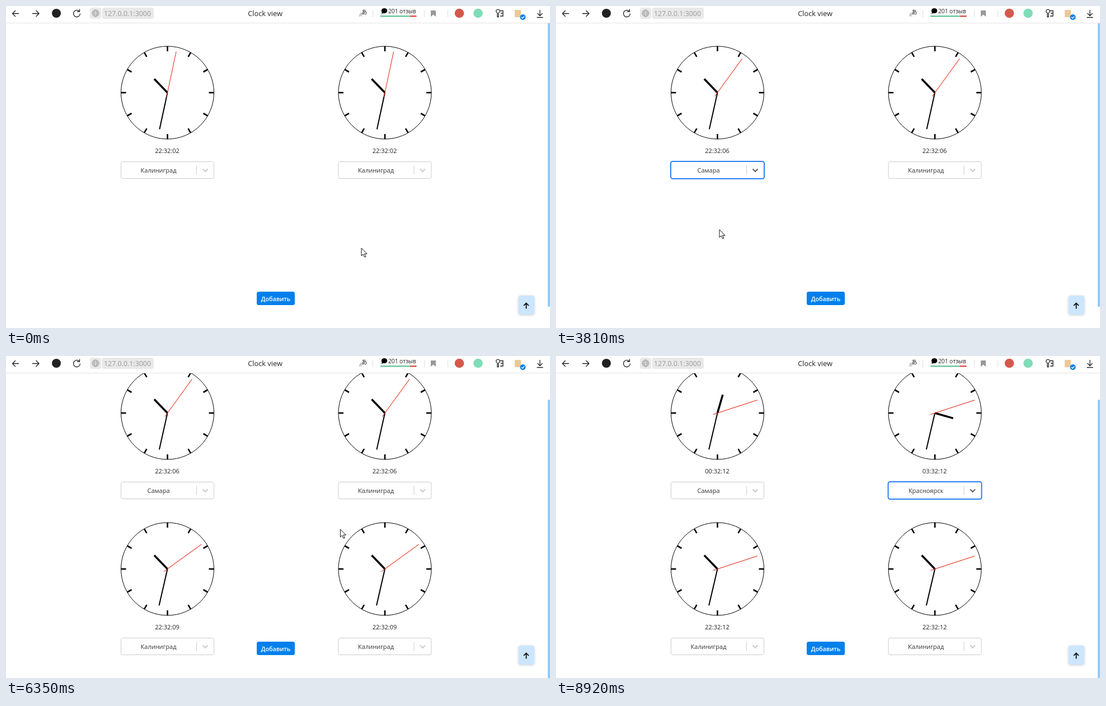
Animation, 972 px wide and 576 px high, one loop 9.47 s. Source, as an HTML page:

```html
<!DOCTYPE html>
<html lang="ru">
<head>
<meta charset="utf-8">
<title>Clock view</title>
<style>
html, body { margin: 0; width: 100%; height: 100%; overflow: hidden; background: #fff; }
svg { display: block; }
text { font: 11px "Open Sans", "Noto Sans", sans-serif; fill: #222; }
.mid { text-anchor: middle; }
.line { fill: none; stroke: #222; stroke-width: 1.3; }
.gray { fill: none; stroke: #999; stroke-width: 1; }
</style>
</head>
<body>
<svg width="972" height="576" viewBox="0 0 972 576">
  <defs>
    <filter id="shade" x="-20%" y="-20%" width="140%" height="140%">
      <feDropShadow dx="0" dy="3" stdDeviation="3.5" flood-opacity=".16"/>
    </filter>
    <filter id="soft" x="-30%" y="-30%" width="160%" height="160%">
      <feDropShadow dx="0" dy="1" stdDeviation="2" flood-opacity=".2"/>
    </filter>
  </defs>
  <g id="page"></g>
  <g id="bar"></g>
  <g id="mouse"></g>
</svg>
<script>
const LOOP = 9470;
const HOME = 'Калиниград';
const CITIES = [HOME, 'Москва', 'Самара', 'Екатеринбург', 'Омск', 'Красноярск', 'Иркутск', 'Якутск', 'Владивосток'];

// Bursts of screen updates: first, last, count
const BURSTS = [
  [320, 460, 3], [670, 670, 1], [860, 1780, 15], [1850, 2640, 12], [2850, 3680, 12],
  [3810, 4550, 12], [4690, 5020, 6], [5220, 6080, 13], [6220, 7160, 14],
  [7230, 7510, 5], [7780, 7980, 4], [8640, 8920, 4]
];

// Pointer tip: time, x, y
const PATH = [
  [1900, 635, 433], [2510, 297, 300], [2900, 297, 299], [3150, 297, 330], [3550, 293, 395],
  [3680, 292, 400], [3870, 292, 400], [4150, 350, 462], [4550, 470, 523], [4690, 474, 523],
  [5400, 473, 522], [5700, 400, 480], [6080, 540, 400], [6450, 640, 243], [6640, 640, 248],
  [7160, 660, 372], [7230, 662, 379], [7510, 668, 425], [8600, 668, 425], [8830, 940, 553]
];
const SCROLL = [[4760, 0], [4825, 18], [4890, 39], [4955, 50], [5020, 53]];
const CLOCKS = [
  { col: 0, row: 0, born: 0, tick: 7300, moved: 6340, hour: 0, open: 2850, pick: 3810, blur: 4690, city: 2 },
  { col: 1, row: 0, born: 0, tick: 7230, moved: 8640, hour: 3, open: 6500, pick: 7780, blur: LOOP, city: 5 },
  { col: 0, row: 1, born: 4740, tick: 7230 },
  { col: 1, row: 1, born: 5340, tick: 7230 }
];

const el = id => document.getElementById(id);
const within = (t, a, b) => t >= a && t < b;
const pad = n => String(n).padStart(2, '0');

function heldTime(t) {
  let held = 0;
  for (const [a, b, n] of BURSTS) {
    if (t < a) break;
    const gap = n > 1 ? (b - a) / (n - 1) : 1;
    held = Math.min(b, a + Math.floor((t - a) / gap + 1e-6) * gap);
  }
  return held;
}

function at(keys, t) {
  if (t <= keys[0][0]) return keys[0].slice(1);
  for (let i = 1; i < keys.length; i++) {
    const a = keys[i - 1], b = keys[i];
    if (t <= b[0]) {
      const k = (t - a[0]) / (b[0] - a[0]);
      return a.slice(1).map((v, j) => v + (b[j + 1] - v) * k);
    }
  }
  return keys[keys.length - 1].slice(1);
}

const rect = (x, y, w, h, fill, rest = '') =>
  `<rect x="${x}" y="${y}" width="${w}" height="${h}" fill="${fill}" ${rest}/>`;
const dot = (x, y, r, fill, rest = '') => `<circle cx="${x}" cy="${y}" r="${r}" fill="${fill}" ${rest}/>`;
const path = (d, rest = 'class="line"') => `<path d="${d}" ${rest}/>`;
const label = (x, y, s, style = '', cls = 'mid') => `<text class="${cls}" x="${x}" y="${y}" style="${style}">${s}</text>`;
const spoke = (deg, from, to, width, color) =>
  `<line y1="${-from}" y2="${-to}" transform="rotate(${deg})" stroke="${color}" stroke-width="${width}"/>`;

function seconds(c, t) {
  if (t < 320) return 2;
  if (t < 860) return 3;
  if (t >= 8640) return 12;
  if (t >= 7440) return 11;
  if (t >= c.tick) return 10;
  return t >= 6340 || c.born ? 9 : 6;
}

function dial(h, s) {
  const min = 32 + s / 60;
  let out = dot(0, 0, 83, 'none', 'stroke="#000"');
  for (let i = 0; i < 12; i++) out += spoke(i * 30, 74, 83, 2.6, '#000');
  return out + spoke((h % 12 + min / 60) * 30, 0, 34, 3.5, '#000') +
    spoke(min * 6, 0, 67, 2, '#000') + spoke(s * 6, -8, 75, 1, '#e8220f');
}

function select(c, t) {
  const focus = within(t, c.open, c.blur);
  const name = t >= c.pick ? CITIES[c.city] : HOME;
  return rect(focus ? -83.5 : -83, focus ? 123 : 123.5, focus ? 167 : 166, focus ? 31 : 30, '#fff',
      focus ? 'rx="3.5" stroke="#2a80f4" stroke-width="2"' : 'rx="3" stroke="#ccc"') +
    label(-16, 143, name, 'fill:#333') +
    rect(51.5, 130.5, 1, 16, '#ccc') +
    path('M63 136.5l4.5 4.5 4.5-4.5', `fill="none" stroke="${focus ? '#5c5c66' : '#ccc'}" stroke-width="2"`) +
    (within(t, c.open, c.pick) ? rect(-74.5, 131, 1, 15, '#222') : '');
}

function menu(cx, cy, [, my]) {
  const top = cy + 161, left = cx - 83.5, step = 29.2;
  const hover = Math.floor((my - top - 3) / step);
  let out = rect(left, top, 167, 250, '#fff', 'rx="3" stroke="#000" stroke-opacity=".12" filter="url(#shade)"');
  out += `<svg x="${left}" y="${top}" width="167" height="250">`;
  CITIES.forEach((name, i) => {
    const y = 3 + i * step;
    if (i === 0 || i === hover) out += rect(0, y, 161, step, i ? '#deebff' : '#2684ff');
    out += label(80.5, y + 19, name, i ? '' : 'fill:#fff');
  });
  return out + rect(161, 0, 6, 181, '#90caf9') + '</svg>';
}

function drawPage(t, mouse) {
  if (t >= 860 && t < 1850) {
    if (t < 920) return '';
    const turn = 236 + (t - 1180) * 0.36;
    return dot(492, 310, 38.3, 'none', `stroke="#6ea2ff" stroke-width="6.6" pathLength="100" stroke-dasharray="75 25" transform="rotate(${turn} 492 310)"`);
  }
  const scroll = at(SCROLL, t)[0];
  let out = '', over = '';
  for (const c of CLOCKS) {
    if (t < c.born) continue;
    const cx = 288.5 + c.col * 388.5, cy = 155 + c.row * 279 - scroll;
    const s = seconds(c, t), h = t >= c.moved ? c.hour : 22;
    out += `<g transform="translate(${cx} ${cy})">${dial(h, s)}` +
      label(-0.5, 107.5, `${pad(h)}:32:${pad(s)}`) + select(c, t) + '</g>';
    if (within(t, c.open, c.pick)) over = menu(cx, cy, mouse);
  }
  const grown = t >= CLOCKS[2].born;
  const total = grown ? 599 : 587;
  out += rect(968, 30 + scroll * 546 / total, 4, 546 * 546 / total, '#90caf9');
  out += rect(448, 511, 68, 24, '#0380ec', 'rx="3.5"') +
    label(482, 527.5, 'Добавить', 'fill:#fff;font-weight:600;font-size:10.7px');
  out += rect(915.5, 518, 28.5, 34, '#cce6ff', 'rx="4" filter="url(#soft)"') +
    path('M929.5 541.5v-9.5M925 536l4.5-4.5 4.5 4.5', 'fill="none" stroke="#000" stroke-width="1.7"');
  return out + over;
}

function drawBar(t) {
  const loading = within(t, 390, 860);
  let out = rect(0, 0, 972, 30, '#fff') + rect(0, 30, 972, 1, '#e4e4e4');
  if (loading) out += rect(0, 30, t < 670 ? 94 : 95, 3, '#fc0');
  out += path('M23 13.5H11.5M17 8l-5.5 5.5 5.5 5.5M47 13.5h12M53.500 8l5.500 5.500-5.500 5.500');
  out += dot(90, 13, 8, '#222');
  out += path(loading ? 'M121 8l10 10M131 8l-10 10' : 'M130.500 9a6 6 0 1 0 2 4.500M131.500 5.500v4.500h-4.500');
  out += rect(150, 3, 20, 20, '#e9e9e9', 'rx="4"') + rect(171.500, 3, 92.500, 20, '#e9e9e9', 'rx="4"');
  out += dot(160, 13, 6, 'none', 'class="gray"') +
    path('M154 13h12M160 7c-4 3-4 9 0 12c4-3 4-9 0-12M155 10h10M155 16h10', 'class="gray"');
  out += label(175, 18, '127.0.0.1:3000', 'fill:#999;font-size:12.4px', '');
  out += label(463, 18, 'Clock view', 'font-size:12.8px');
  out += label(633.5, 19, 'A', 'font-size:8.5px;fill:#888') +
    label(640, 15, 'あ', 'font:8.5px "Noto Sans CJK JP","Noto Sans CJK",sans-serif;fill:#888');
  for (const x of [655, 747, 789]) out += rect(x, 7, 1, 13, '#ddd');
  out += `<ellipse cx="676" cy="8.500" rx="5.200" ry="4.500"/>` + path('M672 10l-1 4 5-2z', '') +
    label(683, 13.3, '201 отзыв', 'font-size:10.2px', '');
  out += rect(669, 17, 53, 2.5, '#6cc79b') + rect(722, 17, 11.500, 2.5, '#dc5349');
  out += path('M759 8h9v11l-4.500-3.500-4.500 3.500z', 'fill="#999"');
  out += dot(810, 13, 8.3, '#d5584c') + dot(843.5, 13, 8.3, loading ? '#b5c4be' : '#7fdcb8');
  out += path('M878 12.500a3.300 3.300 0 1 1 2 0v7h-2zM883 8.500h5v9.500h-5M884 13h4');
  out += rect(909, 7, 11, 13, '#ecc995') + dot(923.5, 20, 5, '#0b80ea') +
    path('M921 20l2 2 3-3.500', 'fill="none" stroke="#fff" stroke-width="1.200"');
  return out + path('M954 7v10.500M949.500 13l4.500 4.500 4.500-4.500M948.500 20.500h11');
}

function drawMouse(t, [x, y]) {
  if (t >= 8900) return '';
  const hand = within(x, 448, 516) && within(y, 511, 535);
  const shape = hand
    ? 'M-1.500 1.500q1.500-2 3 0v6l2-.500 1 1 2-.200 1 1 1.500.300q1 3-.500 6l-.500 3.500h-7l-1-2.500-5-6q0-2 2-1.500l1.500 1.500z'
    : 'M0 0V14L3.200 11l2.400 5.300 2.300-1-2.400-5H10z';
  return path(shape, `transform="translate(${x} ${y})" fill="#fff" stroke="#111" stroke-width="1" stroke-linejoin="round"`);
}

const start = performance.now();
let shown = -1;

function tick() {
  const t = heldTime((performance.now() - start) % LOOP);
  if (t !== shown) {
    const mouse = at(PATH, t);
    el('page').innerHTML = drawPage(t, mouse);
    el('bar').innerHTML = drawBar(t);
    el('mouse').innerHTML = drawMouse(t, mouse);
    shown = t;
  }
  requestAnimationFrame(tick);
}
tick();
</script>
</body>
</html>
```
